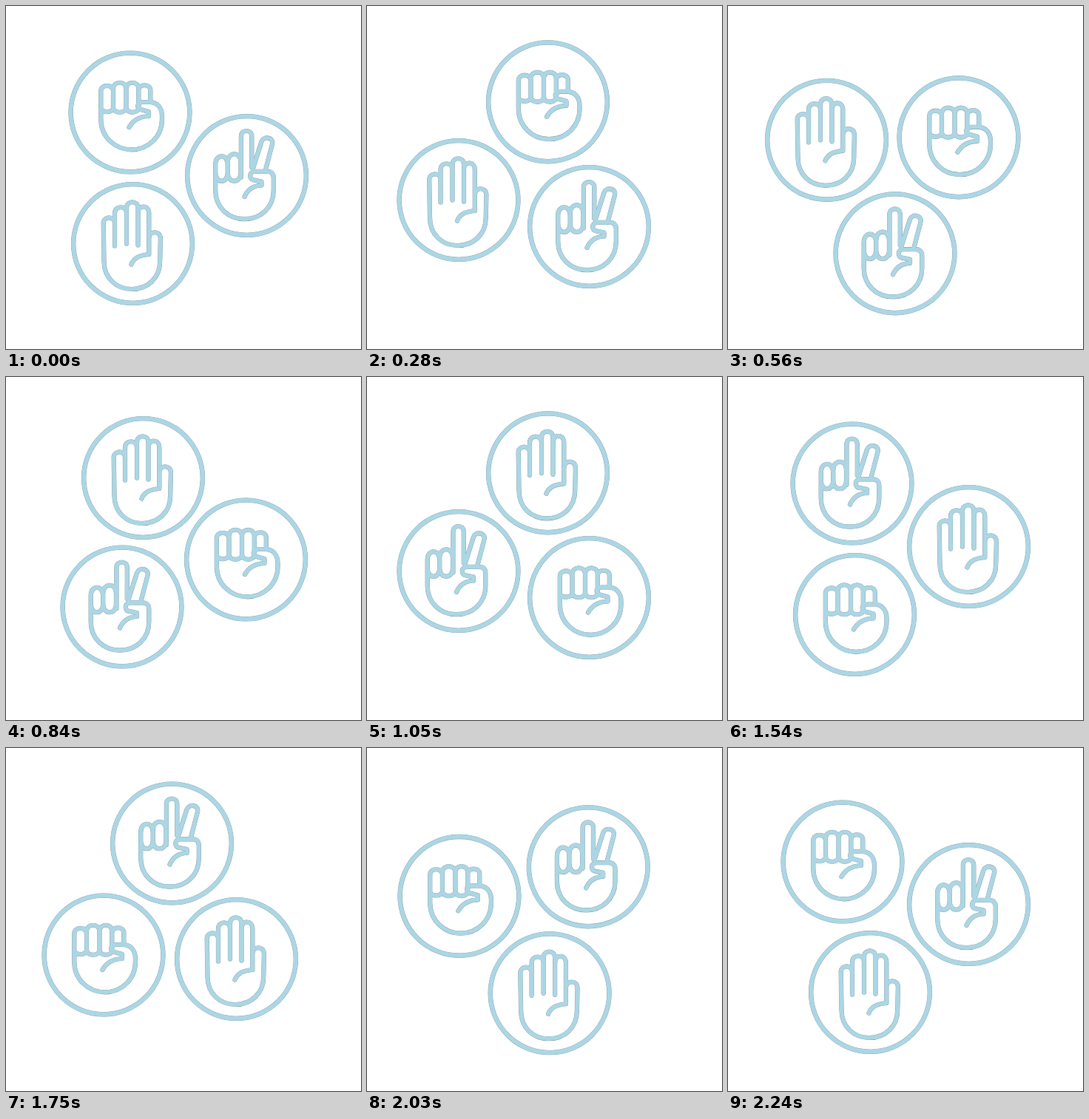
These frames come from a looping animation (480 by 464 pixels, 2310 ms). An HTML page with a canvas:

```html
<!DOCTYPE html>
<html lang="en">
<head>
<meta charset="utf-8">
<title>Rock paper scissors</title>
<style>
html, body { margin: 0; width: 100%; height: 100%; overflow: hidden; background: #fff; }
canvas { display: block; }
</style>
</head>
<body>
<canvas id="stage" width="480" height="464"></canvas>
<script>
const ctx = document.getElementById('stage').getContext('2d');
const STEP = 70, STEPS = 33, CX = 223, CY = 231.6;
const BLUE = '#acd6e4', EDGE = '#84979e';

// Points on the shared orbit: [step, x, y]
const orbit = [
  [0, 168, 144], [1, 185.5, 136.5], [3, 224.5, 129], [4, 244.5, 129.8],
  [8, 312, 177.8], [10, 325.5, 211.5], [11, 325.5, 229.5], [12, 324.5, 247],
  [14, 311.5, 285.5], [15, 300.5, 298.5], [19, 226, 334.8], [21, 192.5, 330.5],
  [22, 171.5, 321.5], [23, 157, 311], [25, 132, 280], [26, 124, 262.5],
  [30, 133.5, 181.3], [32, 155, 154], [33, 168, 144]
].map(([step, x, y]) => ({
  step,
  angle: Math.atan2(y - CY, x - CX),
  radius: Math.hypot(x - CX, y - CY)
}));
for (let i = 1; i < orbit.length; i++) {
  while (orbit[i].angle < orbit[i - 1].angle) orbit[i].angle += 2 * Math.PI;
}

// Hand outlines, relative to the centre of their ring
const rock = new Path2D(`
  M-39.7 -29 V9 C-39.7 33 -21 50.3 1.7 50.3 S43 33 43 9 V5
  C43 -7 36 -14 26 -14 H17 C8 -14 8 -5 16 -3.5 L25 -1 V4.5
  M25 5 C13 5.5 4 10 -1.5 20
  M-39.7 -29 C-39.7 -38.5 -23 -38.5 -23 -29 V-7 C-23 1 -38 1 -39.7 -6
  M-23 -32 C-23 -43 -5.5 -43 -5.5 -32 V-7 C-5.5 2 -23 2 -23 -7
  M-5.5 -32 C-5.5 -43 11.3 -43 11.3 -32 V-7 C11.3 2 -5.5 2 -5.5 -7
  M11.3 -30 C11.3 -39 27.3 -39 27.3 -30 V-15`);

const paper = new Path2D(`
  M-24.5 3 V-27.5 C-24.5 -37.7 -39.8 -37.7 -39.8 -27.5 L-39 24
  C-39 47 -22 61.5 -1.3 61.5 S36.7 47 36.7 24 L37.4 -7
  C37.4 -18 21.8 -18 21.8 -7
  M-24.5 -27 V-41 C-24.5 -52 -8.5 -52 -8.5 -41 V0
  M-8.5 -41 V-48 C-8.5 -59 7 -59 7 -48 V2
  M7 -41 C7 -53 21.8 -53 21.8 -41 V14.5 C10 15.5 1 19 -2 28`);

const scissors = new Path2D(`
  M-42.3 -15 V20 C-42.3 43 -25 58.6 -3 58.6 S36.3 43 36.3 20 V3
  C36.3 -3 33 -5.6 28 -5.6 H11 C3 -5.6 3 4.5 9 5.8 L20 8 V13
  M20 13 C9 13.5 1 19 -3 28.5
  M-42.3 -15 C-42.3 -30 -25.8 -30 -25.8 -15 V-4 C-25.8 11 -42.3 11 -42.3 -4
  M-25.8 -18 C-25.8 -33 -8 -33 -8 -18 V-4 C-8 11 -25.8 11 -25.8 -4
  M-7.6 2 V-53 C-7.6 -63 6.8 -63 6.8 -53 V-11
  M8.5 -10 L20 -46 C23 -54.5 36.5 -51.5 34.6 -43 L25.5 -8`);

const hands = [rock, scissors, paper];
const ring = new Path2D();
ring.arc(0, 0, 80.4, 0, 2 * Math.PI);

function place(step) {
  const s = step % STEPS;
  const i = orbit.findIndex(p => p.step > s);
  const a = orbit[i - 1], b = orbit[i];
  const k = (s - a.step) / (b.step - a.step);
  const angle = a.angle + (b.angle - a.angle) * k;
  const radius = a.radius + (b.radius - a.radius) * k;
  return [CX + radius * Math.cos(angle), CY + radius * Math.sin(angle)];
}

function outline(path, width) {
  ctx.strokeStyle = EDGE;
  ctx.lineWidth = width + 0.6;
  ctx.stroke(path);
  ctx.strokeStyle = BLUE;
  ctx.lineWidth = width;
  ctx.stroke(path);
}

function draw(step) {
  ctx.fillStyle = '#fff';
  ctx.fillRect(0, 0, 480, 464);
  ctx.lineCap = ctx.lineJoin = 'round';
  hands.forEach((hand, i) => {
    ctx.save();
    ctx.translate(...place(step + i * STEPS / 3));
    outline(ring, 5.8);
    outline(hand, 5.6);
    ctx.restore();
  });
}

const start = performance.now();
function tick() {
  draw(Math.floor((performance.now() - start) / STEP) % STEPS);
  requestAnimationFrame(tick);
}
tick();
</script>
</body>
</html>
```
